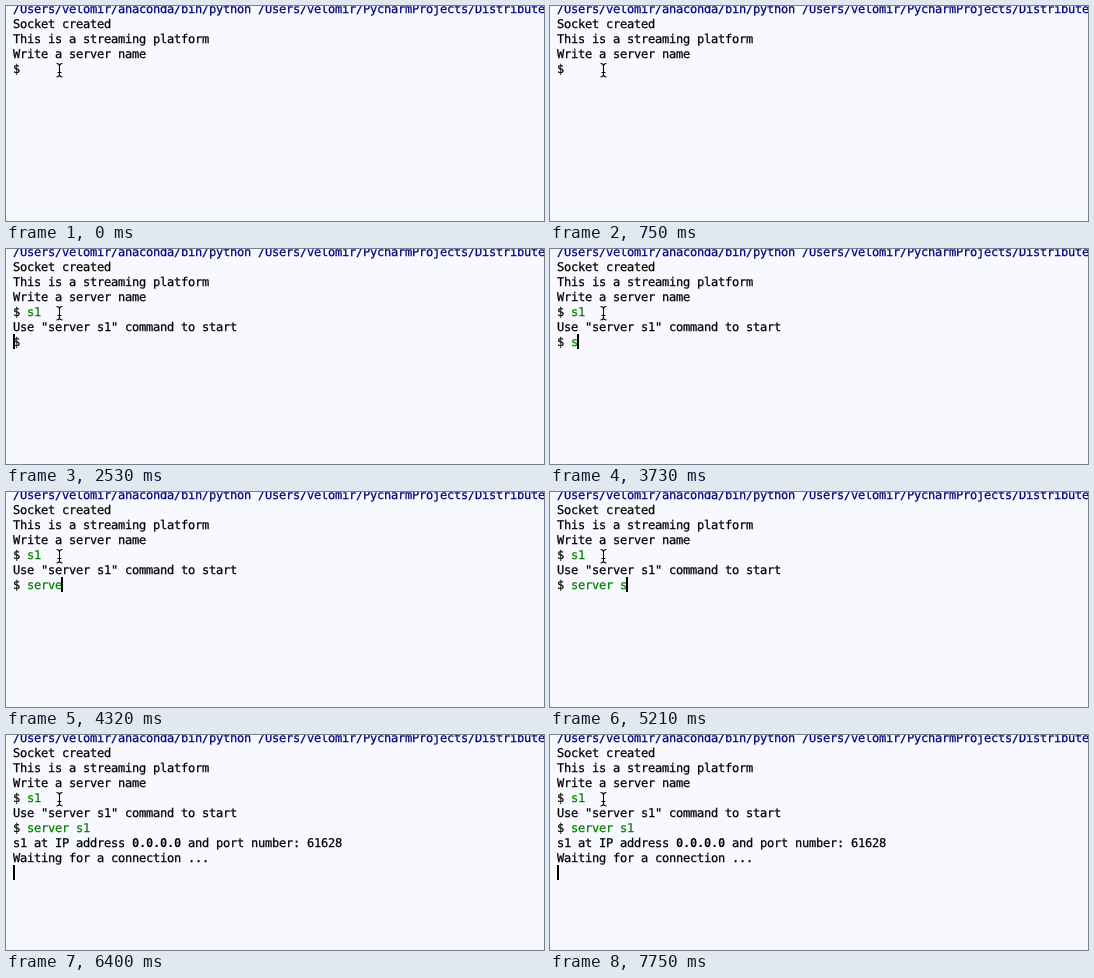
Animation of 538x215 px, one loop 8000 ms. Source, as an HTML page:

```html
<!DOCTYPE html>
<html lang="en">
<head>
<meta charset="utf-8">
<title>Console session</title>
<style>
html, body { margin: 0; width: 100%; height: 100%; overflow: hidden; background: #f7f9ff; }
svg { display: block; }
text {
  font: 12px "DejaVu Sans Mono", monospace;
  letter-spacing: calc(7px - 1ch);
  text-rendering: geometricPrecision;
  white-space: pre;
  fill: currentColor;
  stroke: currentColor;
  stroke-width: 0.25px;
}
.out { color: #000; }
.path { color: #000080; }
.key { color: #007f00; }
.bold { color: #000; font-weight: bold; stroke: none; }
</style>
</head>
<body>
<svg width="538" height="215" viewBox="0 0 538 215">
  <g id="screen"></g>
  <rect id="caret" width="2" height="15"/>
  <g fill="none">
    <use href="#beam" stroke="#fff" stroke-width="2.4"/>
    <use href="#beam" stroke="#000" stroke-width="1.1"/>
  </g>
  <defs>
    <path id="beam" d="M50.5 57.5Q53.5 57.5 53.5 60V68.5Q53.5 71 50.5 71M56.5 57.5Q53.5 57.5 53.5 60M53.5 68.5Q53.5 71 56.5 71M51.5 66.5H55.5"/>
  </defs>
</svg>
<script>
const LOOP = 8000, CELL = 7, ROW = 15, LEFT = 7, BASE = 7;
const screenEl = document.getElementById("screen");
const caretEl = document.getElementById("caret");

// The session: time, kind of event, text
const session = [
  [0, "path", "/Users/velomir/anaconda/bin/python /Users/velomir/PycharmProjects/Distributed\n"],
  [0, "out", "Socket created\nThis is a streaming platform\nWrite a server name\n$ "],
  [0, "key", ""],
  [0, "blink"],
  [300, "blink"],
  [750, "blink"],
  [1350, "blink"],
  [1490, "key", "s"],
  [1640, "key", "1"],
  [2240, "blink"],
  [2380, "key", "\n"],
  [2530, "out", 'Use "server s1" command to start\n$ '],
  [3280, "blink"],
  [3730, "key", "s"],
  [4030, "key", "er"],
  [4320, "key", "ve"],
  [4470, "key", "r"],
  [4620, "key", " "],
  [5210, "key", "s"],
  [5660, "key", "1"],
  [6250, "key", "\n"],
  [6400, "out", "s1 at IP address "],
  [6400, "bold", "0.0.0.0"],
  [6400, "out", " and port number: 61628\nWaiting for a connection ...\n"],
  [7300, "blink"],
  [7750, "blink"]
];

function addText(row, col, text, kind) {
  const el = document.createElementNS("http://www.w3.org/2000/svg", "text");
  el.setAttribute("class", kind);
  el.setAttribute("x", LEFT + col * CELL);
  el.setAttribute("y", BASE + row * ROW);
  el.textContent = text;
  screenEl.append(el);
}

// Typing puts the caret at the end of its line, output leaves it at the start
function replay(events) {
  let row = 0, col = 0, caretCol = 0, lit = false;
  screenEl.replaceChildren();
  for (const [, kind, text] of events) {
    if (kind === "blink") {
      lit = !lit;
      continue;
    }
    text.split("\n").forEach((part, i) => {
      if (i) { row++; col = 0; }
      if (part) addText(row, col, part, kind);
      col += part.length;
    });
    caretCol = kind === "key" ? col : 0;
    lit = true;
  }
  caretEl.setAttribute("x", Math.max(LEFT, LEFT + caretCol * CELL - 1));
  caretEl.setAttribute("y", row * ROW - 5);
  caretEl.setAttribute("visibility", lit ? "visible" : "hidden");
}

let done = 0;
function draw(t) {
  const past = session.filter(([start]) => start <= t);
  if (past.length !== done) replay(past);
  done = past.length;
}

const begin = performance.now();
function tick() {
  draw((performance.now() - begin) % LOOP);
  requestAnimationFrame(tick);
}
tick();
</script>
</body>
</html>
```
